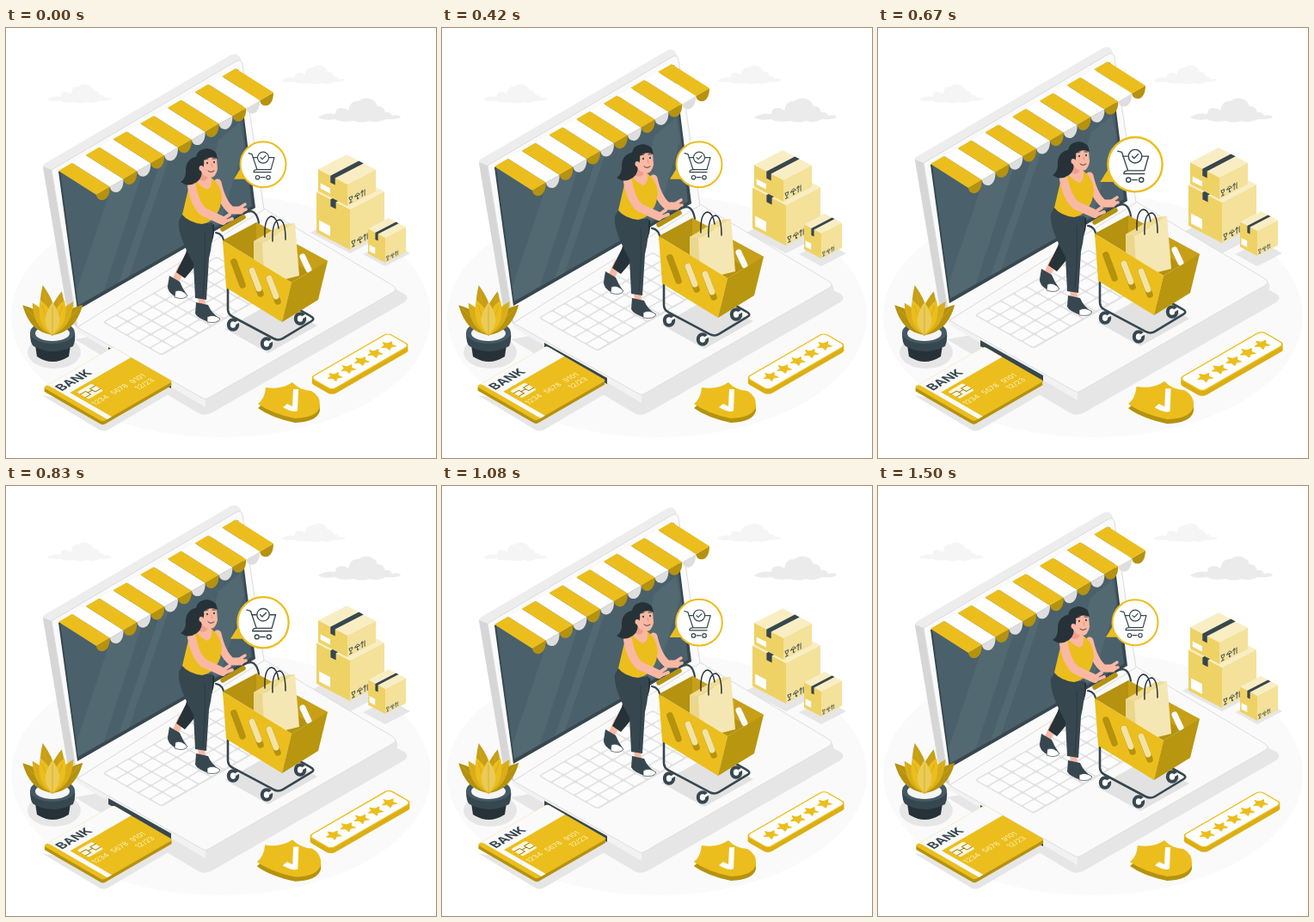
An HTML page for the animation above (1.54 s loop, 500x500 px).

```html
<!DOCTYPE html>
<html lang="en">
<head>
<meta charset="utf-8">
<title>Online shop</title>
<style>
html, body { margin: 0; height: 100%; overflow: hidden; background: #fff; }
svg { display: block; width: 100vw; height: 100vh; }
text { font-family: Inter, Roboto, sans-serif; }
</style>
</head>
<body>
<svg id="stage" viewBox="0 0 500 500"></svg>
<script>
const GOLD = '#ebbe1d', DEEP = '#b5920f', INK = '#37474f', DARK = '#263238', SKIN = '#f9b8a3', GREY = '#e6e6e6';
const LOOP = 1540;

const path = (d, fill, extra = '') => `<path d="${d}" fill="${fill}" ${extra}/>`;
const poly = (points, fill, extra = '') => `<polygon points="${points}" fill="${fill}" ${extra}/>`;
const line = (d, color, width) =>
  path(d, 'none', `stroke="${color}" stroke-width="${width}" stroke-linecap="round" stroke-linejoin="round"`);
const rect = (x, y, w, h, fill, extra = '') =>
  `<rect x="${x}" y="${y}" width="${w}" height="${h}" fill="${fill}" ${extra}/>`;
const oval = (x, y, rx, ry, fill, extra = '') =>
  `<ellipse cx="${x}" cy="${y}" rx="${rx}" ry="${ry}" fill="${fill}" ${extra}/>`;
const group = (body, transform, id = '') => `<g id="${id}" transform="${transform}">${body}</g>`;
const iso = (x, y, body) => group(body, `matrix(.866 -.5 .866 .5 ${x} ${y})`);
const repeat = (n, draw) => Array.from({ length: n }, (_, i) => draw(i)).join('');

const cloud = (x, y, scale, fill) => group(path(
  'M0 23Q8 17 20 19Q20 12 27 12Q32 12 35 15Q37 3 47 4Q52 0 59 1Q67 3 69 10Q76 9 78 17Q84 16 86 21Q94 19 96 23Q90 26 79 25Q70 30 60 27Q50 30 42 27Q25 29 20 25Q6 27 0 23z',
  fill), `translate(${x} ${y}) scale(${scale})`);

function laptop() {
  const keys = repeat(45, i =>
    rect(1.5 + (i % 9) * 14.6, 1.5 + Math.floor(i / 9) * 13.4, 13, 11.8, '#fcfcfc', 'rx="2"'));
  return poly('78,340 232,432 232,441 83,353', '#f2f2f2')
    + path('M232 432L453 303Q457 307 454 314L239 439Q235 441 232 441z', GREY)
    + path('M83 348L300 210L449 299Q457 304 449 308L236 430Q232 433 228 430z', '#fafafa', 'stroke="#dedede"')
    + group(rect(0, 0, 133, 69, '#e2e2e2', 'rx="3"') + keys, 'matrix(1 -.575 1 .565 112 342)')
    + path('M43 163Q42 159 46 157L262 31Q270 28 273 36L300 211L83 348L73 340z', '#ededed')
    + poly('43,161 53,165 83,348 73,340', '#d6d6d6')
    + path('M53 165L267 39Q273 35 275 42L300 211L83 348z', '#fafafa', 'stroke="#dcdcdc"')
    + poly('61,167 270,48 290,209 83,328', INK)
    + poly('63,167 269,50 286,207 84,323', '#4a606b')
    + poly('122,187 158,170 114,305 84,322 82,305', '#536972')
    + poly('180,155 191,148 143,289 131,296', '#536972')
    + poly('247,130 272,110 277,135 250,225 219,244', '#536972')
    + poly('119,371 192,412 192,419 119,378', INK);
}

function awning() {
  const dx = 206 / 13, dy = -119 / 13;
  return repeat(13, i => {
    const x = 61 + i * dx, y = 166 + i * dy, odd = i % 2;
    return path(`M${x + 44} ${y + 28}c1 9 16 10 ${dx} ${dy}z`, odd ? '#dedede' : DEEP)
      + path(`M${x} ${y}l${dx} ${dy}l44 28l${-dx} ${-dy}z`, odd ? '#fff' : GOLD);
  });
}

function woman() {
  return line('M204 278L198 292M227 308L228 324', SKIN, 8)
    + line('M246 180Q251 203 262 212L273 212', SKIN, 9)
    + line('M267 212L278 205M269 214L279 211', SKIN, 3.5)
    + path('M242 228Q244 248 230 265L208 291L198 284L209 262L216 236z', DARK)
    + path('M205 217Q222 231 240 226Q241 248 236 268L233 316L220 314L218 274Q199 240 201 224z', INK)
    + line('M231 238Q233 264 229 311', '#2c3b42', 1)
    + path('M190 288L202 295Q205 303 211 311Q207 316 198 313Q187 307 188 300z', INK)
    + path('M197 306Q204 303 211 311Q207 317 196 313z', '#fff', `stroke="${INK}" stroke-width=".7"`)
    + path('M221 319L235 322Q239 332 249 338Q247 343 236 342Q222 337 220 332z', INK)
    + path('M234 336Q241 332 249 338Q247 344 234 342z', '#fff', `stroke="${INK}" stroke-width=".7"`)
    + path('M222 168L234 168L236 178Q230 188 220 181z', '#ee9f8a')
    + path('M220 177Q226 188 237 173Q250 181 251 198L249 208Q243 225 228 228Q212 226 205 217L213 183z', GOLD)
    + path('M223 175Q232 182 235 172L239 175Q240 186 234 188Q226 184 222 179z', SKIN)
    + line('M216 184Q220 206 230 214L252 224', SKIN, 10)
    + line('M251 223L260 217M253 226L263 222', SKIN, 4)
    + path('M224 149Q210 151 209 164Q210 175 203 179Q212 186 222 179Q229 175 228 160z', DARK)
    + path('M227 154Q236 145 245 151L246 164Q244 174 237 174Q229 173 226 165z', SKIN)
    + path('M221 152Q221 141 234 140Q245 141 246 152Q237 148 230 154Q231 160 228 164L223 163z', DARK)
    + oval(227, 163, 2.5, 3, SKIN)
    + oval(234, 157, .9, 1.3, DARK) + oval(242, 156, .9, 1.3, DARK)
    + line('M231 153L235 152M240 152L244 152M235 166Q238 169 242 166', DARK, .9)
    + line('M239 158L240 162', '#e58b74', .9);
}

function cart() {
  const wheel = (x, y) => oval(x, y, 5.2, 5.8, '#fff', `stroke="${INK}" stroke-width="4"`)
    + line(`M${x + 2} ${y - 1}l5 -3`, '#f2f2f2', 3);
  const slot = (x, y, fill) => line(`M${x} ${y}l10 27`, DEEP, 7.5) + line(`M${x} ${y}l8 21`, fill, 7);
  return poly('255,350 305,378 362,346 312,318', '#e2e2e2')
    + wheel(264, 345) + wheel(303, 367) + wheel(342, 338)
    + line('M258 303V327Q258 333 264 336L311 361Q317 364 322 361L355 341Q360 338 354 335L338 326', INK, 2.6)
    + line('M244 238Q253 239 254 252M276 216Q291 207 294 227', INK, 2.2)
    + line('M252 234L276 220', DEEP, 5.5)
    + poly('252,247 291,226 374,271 332,296', DEEP)
    + poly('291,226 374,271 358,286 291,247', '#c7a018')
    + line('M345 266L352 281', '#fafafa', 7)
    + poly('288,248 299,242 314,290 288,276', '#ead78c')
    + poly('298,250 336,227 341,288 325,292 300,284', '#f5e7b3')
    + poly('288,248 322,228 336,227 298,250', '#efdc95')
    + line('M301 243Q300 220 309 219Q315 220 317 233M310 248Q309 224 318 223Q325 224 325 246', DARK, 1.5)
    + poly('252,247 332,296 321,342 256,302', GOLD)
    + poly('332,296 374,271 363,316 321,342', '#b8960f')
    + slot(265, 272, DEEP) + slot(286, 282, '#f3e3a4') + slot(306, 291, '#f3e3a4');
}

function crate(x, y, a, b, h) {
  const s = .52, la = -a * s, rb = -b * s;
  const mark = Math.min(b / 46, .72);
  const icons = line('M3 7h5q0 5-2.5 5T3 7M5.500 12v4m-2 0h4M12 10q4-7 8 0zM16 10v6q2 2 2-1M24 16V7m-2 2l2-3l2 3M28 16V7', INK, 1.1);
  return path(`M${x} ${y}l${-a} ${la}l${b} ${rb}l${a} ${-la}z`, '#f9eec3')
    + path(`M${x} ${y}l${-a} ${la}v${h}l${a} ${-la}z`, '#efd266')
    + path(`M${x} ${y}l${b} ${rb}v${h}l${-b} ${-rb}z`, '#f4e19a')
    + path(`M${x - a * .42} ${y + la * .42}l${b} ${rb}l${-a * .16} ${la * .16}l${-b} ${-rb}v8l${a * .16} ${-la * .16}z`, INK)
    + path(`M${x - a * .92} ${y + h + la * .92 - 4}v${-h * .25}l${a * .33} ${-la * .33}v${h * .25}z`, '#fff')
    + group(icons, `matrix(${mark} ${-s * mark} 0 ${mark} ${x} ${y + h - 19 * mark})`);
}

function plant() {
  const leaf = (angle, length, width, fill) => group(
    path(`M0 0C${-width} ${-length * .3} ${-width} ${-length * .6} 0 ${-length}C${width} ${-length * .6} ${width} ${-length * .3} 0 0z`, fill)
    + line(`M0 0V${-length * .85}`, '#d3a817', .7), `translate(54 357) rotate(${angle})`);
  return path('M33 362L36 382Q54 394 73 382L76 362z', DARK)
    + path('M28 354Q28 367 32 370Q54 382 78 370Q81 364 80 354z', INK)
    + oval(54, 354, 26, 13, '#455a64') + oval(54, 355, 20, 9, '#f5f5f5')
    + leaf(-45, 49, 11, DEEP) + leaf(45, 50, 11, DEEP)
    + leaf(-11, 59, 11, '#c79f17') + leaf(12, 52, 11, '#c79f17')
    + leaf(-32, 44, 10, '#d9ae1a') + leaf(32, 46, 10, '#d9ae1a')
    + leaf(-19, 43, 10, GOLD) + leaf(19, 43, 10, GOLD)
    + leaf(0, 38, 11, '#eacb58');
}

function bankCard() {
  const face = rect(0, 0, 94, 80, GOLD, 'rx="3"')
    + path('M5 0H91Q94 0 94 3V24H12V80H6V3z', '#fafafa')
    + `<text x="8" y="17" font-size="14.500" font-weight="700" fill="${INK}">BANK</text>`
    + rect(17, 28, 20, 16, '#fff6d8', 'rx="2"')
    + line('M17 33h7v7h-7M37 33h-7v7h7M24 36h6', '#8a7528', 1)
    + '<g fill="#fff3c4" font-size="8.600"><text x="14" y="56" word-spacing="3">1234 5678 9101</text><text x="61" y="67">12/23</text></g>';
  return repeat(2, i => iso(43, 422 - i * 2, rect(0, 0, 94, 80, DEEP, 'rx="3"'))) + iso(43, 418, face);
}

function shield() {
  const shape = 'M302 418Q320 421 333 412Q341 421 355 422Q366 428 365 440Q362 453 336 454Q308 448 293 437Q301 431 302 418z';
  return group(path(shape, DEEP), 'translate(0 5)') + path(shape, GOLD)
    + path('M322 441L327 437L333 440L334 420L340 420L339 445Q334 448 322 441z', '#fff');
}

function rating() {
  const star = i => poly(Array.from({ length: 10 }, (_, k) => {
    const r = k % 2 ? 3.6 : 7.3, angle = (k / 5 - .5) * Math.PI;
    return `${17.5 + 18 * i + r * Math.cos(angle)},${15 + r * Math.sin(angle)}`;
  }).join(' '), GOLD, `stroke="${GOLD}" stroke-linejoin="round"`);
  const slab = (y, fill, edge) => iso(354, y, rect(0, 0, 104, 29, fill, `rx="5" stroke="${edge}" stroke-width="1.500"`));
  return slab(412, '#dcae14', '#dcae14') + slab(409, '#dcae14', '#dcae14') + slab(406.5, '#fff', GOLD)
    + iso(354, 406.5, repeat(5, star));
}

function bubble() {
  return poly('-34,17 -26,4 -19,17', GOLD)
    + oval(0, 0, 26.5, 26.5, '#fff', `stroke="${GOLD}" stroke-width="2"`)
    + line('M-17 -13L-13 -12L-7 6H9L13 -8H7M-12 -8H-7M-7 6Q-11 6 -11 9H9', INK, 1.2)
    + oval(0, -8, 6.5, 6.5, '#fff', `stroke="${INK}" stroke-width="1.200"`)
    + line('M-3 -8L-1 -6L3 -10M-3 15H2', INK, 1.2)
    + oval(-6.5, 15, 2.2, 2.2, '#fff', `stroke="${INK}" stroke-width="1.200"`)
    + oval(6, 15, 2.2, 2.2, '#fff', `stroke="${INK}" stroke-width="1.200"`);
}

const stage = document.getElementById('stage');
stage.innerHTML = oval(250, 335, 244, 141, '#fafafa')
  + cloud(48, 65, .78, '#f5f5f5') + cloud(320, 43, .78, '#f5f5f5') + cloud(363, 81, 1, '#ebebeb')
  + path('M80 362L224 448Q231 452 240 447L463 319Q470 313 463 309L440 297z', GREY)
  + poly('354,238 400,262 448,237 402,212', GREY) + poly('415,263 441,277 470,262 445,248', GREY)
  + oval(56, 377, 31, 19, GREY)
  + path('M42 427L108 467Q113 470 119 467L192 424V414L110 440z', GREY)
  + group(laptop() + awning() + woman() + cart()
    + crate(400, 211, 39, 40, 47) + crate(397, 182, 34, 33, 25) + crate(441, 244, 20, 24, 29), '', 'floating')
  + plant()
  + group(bankCard(), '', 'card')
  + group(shield(), '', 'shield') + group(rating(), '', 'rating') + group(bubble(), '', 'bubble');

const place = (id, transform) => document.getElementById(id).setAttribute('transform', transform);
const zoom = (id, x, y, scale) => place(id, `translate(${x} ${y}) scale(${scale}) translate(${-x} ${-y})`);

function draw(now) {
  const time = now % LOOP, phase = time / LOOP;
  const beat = phase * 3 % 1;
  const pulse = beat > .05 && beat < .8 ? Math.sin(Math.PI * (beat - .05) / .75) ** 2 : 0;
  const slide = -1.3 + 1.7 * Math.cos(2 * Math.PI * (phase * 2 - .08));
  const lift = Math.max(0, 1 - Math.abs(time / 750 - 1));
  place('floating', `translate(0 ${-9 * lift})`);
  place('card', `translate(${slide} ${slide * .45})`);
  place('bubble', `translate(299 158.7) scale(${1 + .25 * pulse})`);
  zoom('shield', 329, 436, 1 + .07 * pulse);
  zoom('rating', 413, 390, 1 + .08 * pulse);
  requestAnimationFrame(() => draw(performance.now()));
}
draw(0);
</script>
</body>
</html>
```
